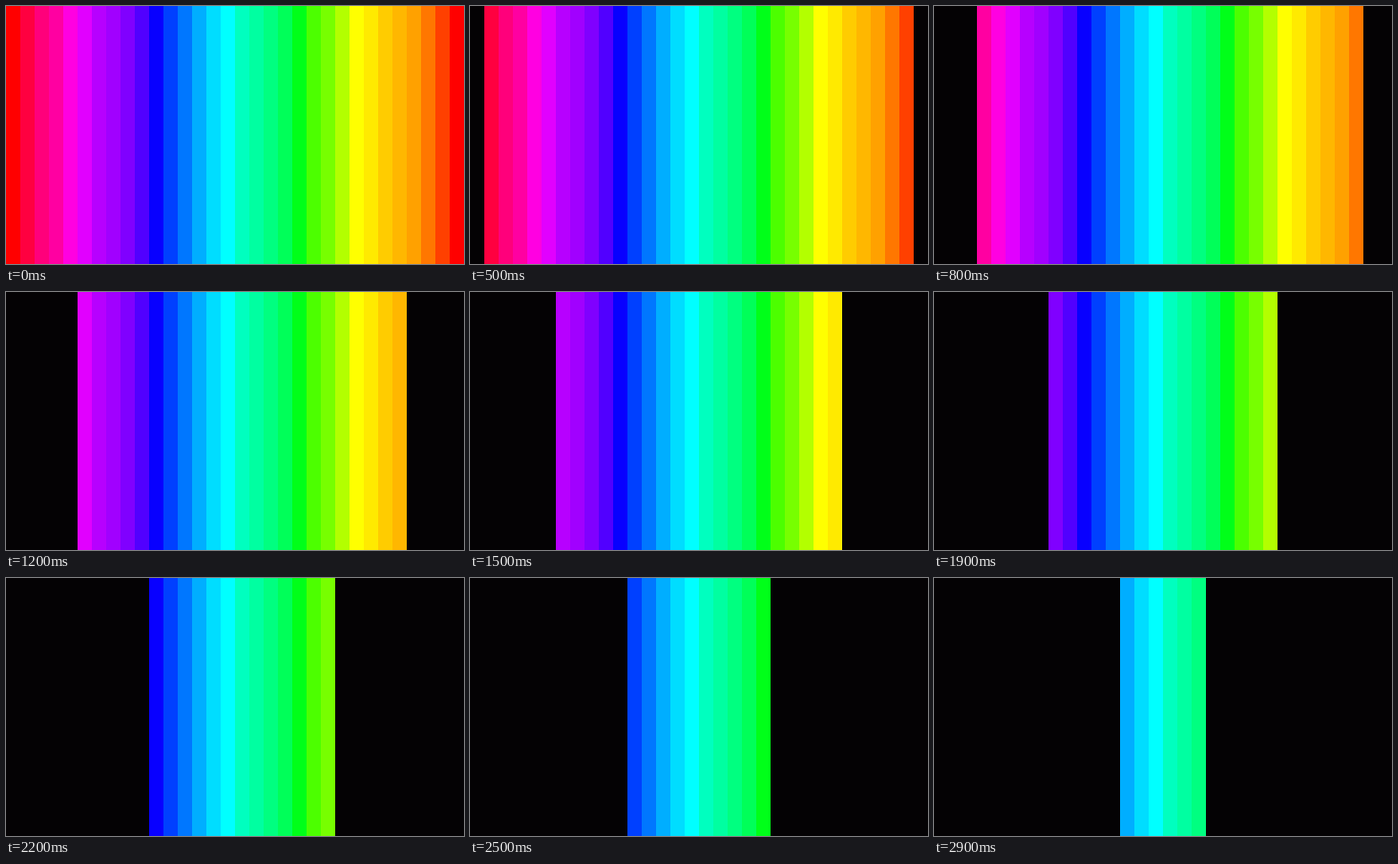
Animation, 480 px wide and 270 px high, one loop 3 s. Source, as an HTML page:

```html
<!DOCTYPE html>
<html lang="en">
<head>
<meta charset="utf-8">
<title>Closing spectrum</title>
<style>
  html, body { margin: 0; width: 100%; height: 100%; overflow: hidden; background: #040204; }
  svg { display: block; width: 100%; height: 100%; }
</style>
</head>
<body>
<svg id="stage" viewBox="0 0 480 270" shape-rendering="crispEdges"></svg>
<script>
const LOOP = 3000, STEP = 100, HOLD = 400, BAR = 15;
const hues = [
  0, 345, 331, 322, 307, 293, 283, 278, 270, 259, 242, 225, 212, 199, 188, 180,
  165, 158, 150, 141, 126, 102, 92, 78, 60, 55, 48, 43, 38, 28, 15, 0
];
const stage = document.getElementById("stage");

function addRect(x, width, fill) {
  const rect = document.createElementNS("http://www.w3.org/2000/svg", "rect");
  const attrs = { x, y: 0, width, height: 270, fill };
  for (const key in attrs) rect.setAttribute(key, attrs[key]);
  stage.appendChild(rect);
  return rect;
}

addRect(0, 480, "#040204");
const bars = hues.map((hue, i) => addRect(i * BAR, BAR, `hsl(${hue}, 100%, 50%)`));

// After the hold, one bar goes dark per step: left edge, then right edge.
function draw(time) {
  const t = time % LOOP;
  const gone = t < HOLD ? 0 : Math.floor((t - HOLD) / STEP) + 1;
  const left = Math.ceil(gone / 2);
  const right = bars.length - Math.floor(gone / 2);
  bars.forEach((bar, i) => {
    bar.setAttribute("visibility", i >= left && i < right ? "visible" : "hidden");
  });
}

const start = performance.now();
function tick() {
  draw(performance.now() - start);
  requestAnimationFrame(tick);
}
tick();
</script>
</body>
</html>
```
